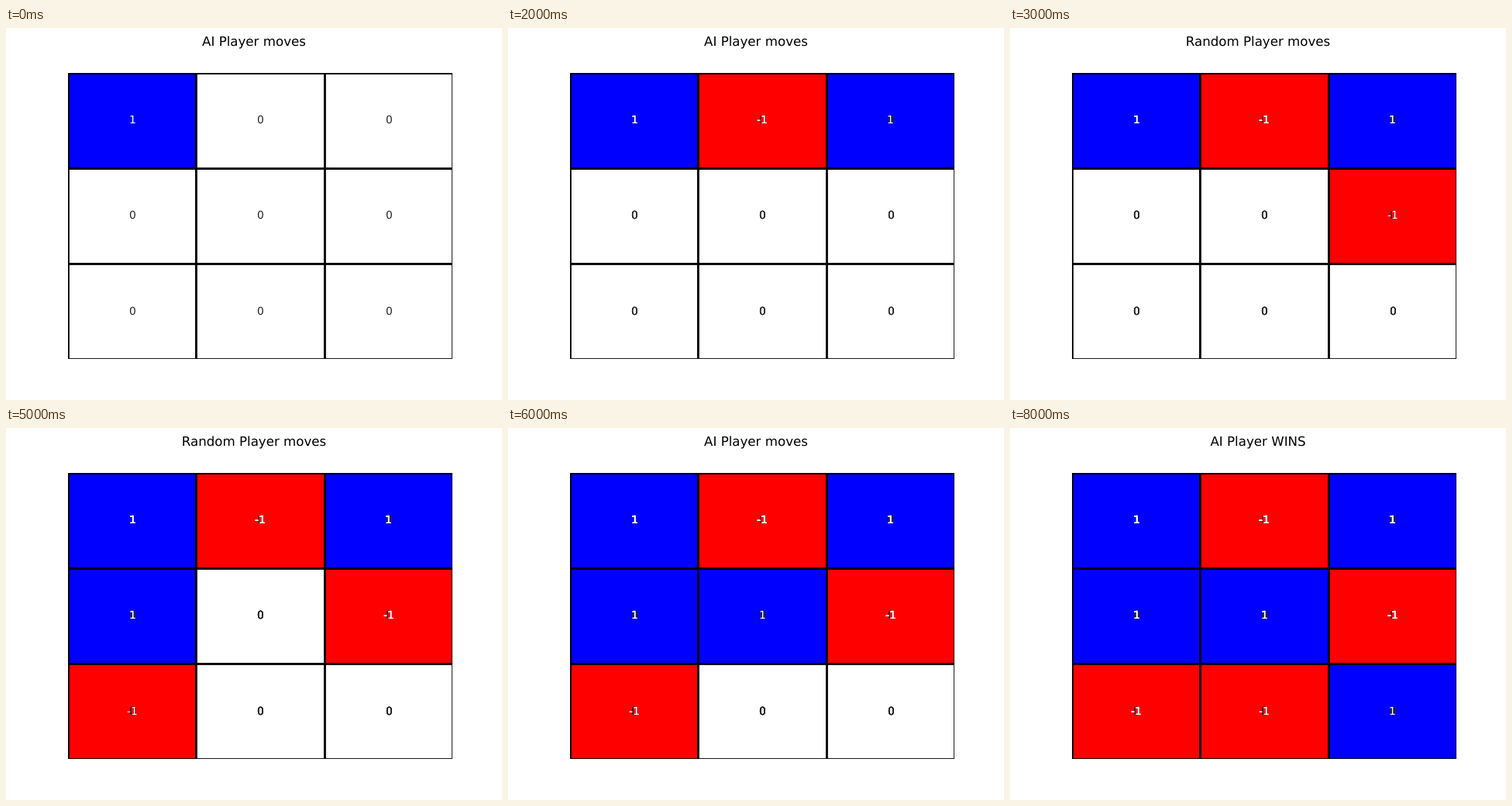
Recreate the animation shown at these times as an HTML page with a canvas. Size 640 by 480 pixels, loop 9 s.

```html
<!DOCTYPE html>
<html lang="en">
<head>
<meta charset="utf-8">
<title>Noughts and crosses</title>
<style>
html, body { margin: 0; width: 100%; height: 100%; overflow: hidden; background: #fff; }
canvas { display: block; }
</style>
</head>
<body>
<canvas id="stage" width="640" height="480"></canvas>
<script>
const ctx = document.getElementById('stage').getContext('2d');
const STEP = 1000;
const moves = [0, 1, 2, 5, 3, 6, 4, 7, 8];   // cell taken at each step, players alternate
const xs = [80.5, 245.5, 411.5, 576.5];
const ys = [58.5, 181.5, 304.5, 427.5];
const baselines = [123, 246, 370];
const halfWidth = { '0': 3.55, '1': 3.9, '-1': 6.55 };
const fills = { '0': '#fff', '1': '#00f', '-1': '#f00' };
const font = px => px + 'px "DejaVu Sans", sans-serif';

function boardAt(step) {
  const board = Array(9).fill(0);
  moves.slice(0, step + 1).forEach((cell, i) => board[cell] = i % 2 ? -1 : 1);
  return board;
}

function title(step) {
  if (step === moves.length - 1) return 'AI Player WINS';
  return (step % 2 ? 'Random' : 'AI') + ' Player moves';
}

function drawCells(board) {
  ctx.save();
  ctx.beginPath();
  ctx.rect(80, 58, 496, 369);
  ctx.clip();
  ctx.lineWidth = 2.78;
  ctx.strokeStyle = '#000';
  board.forEach((value, i) => {
    const c = i % 3, r = Math.floor(i / 3);
    const box = [xs[c], ys[r], xs[c + 1] - xs[c], ys[r + 1] - ys[r]];
    ctx.fillStyle = fills[value];
    ctx.fillRect(...box);
    ctx.strokeRect(...box);
  });
  ctx.restore();
}

function drawLabels(board) {
  ctx.font = font(13.89);
  ctx.textAlign = 'left';
  board.forEach((value, i) => {
    const centre = 80 + (i % 3 + 0.5) * 496 / 3;
    ctx.fillStyle = value ? '#fff' : '#262626';
    ctx.fillText(value, Math.round(centre - halfWidth[value]), baselines[Math.floor(i / 3)]);
  });
}

function draw(step) {
  ctx.fillStyle = '#fff';
  ctx.fillRect(0, 0, 640, 480);
  ctx.textRendering = 'geometricPrecision';
  drawCells(boardAt(step));
  // Labels pile up: each step prints over the earlier ones.
  for (let s = 0; s <= step; s++) drawLabels(boardAt(s));
  ctx.font = font(16.67);
  ctx.textAlign = 'center';
  ctx.fillStyle = '#000';
  ctx.fillText(title(step), 320, 23);
}

const start = performance.now();
function tick() {
  const elapsed = performance.now() - start;
  draw(Math.floor(elapsed / STEP) % moves.length);
  requestAnimationFrame(tick);
}
tick();
</script>
</body>
</html>
```
